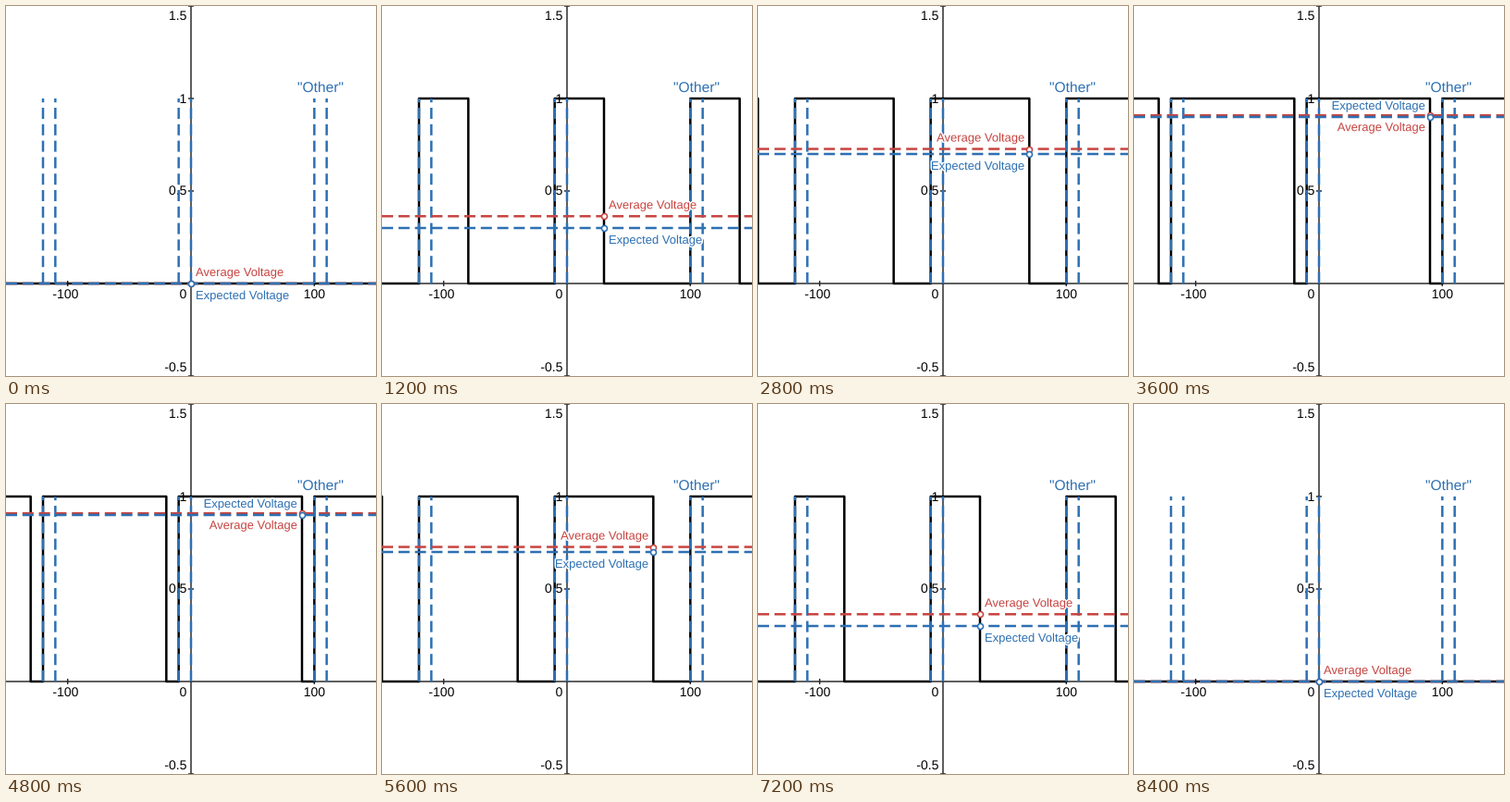
Write a matplotlib script that moves like this. It is 400 px wide and 400 px high and loops after 8.8 s.

```python
import matplotlib.pyplot as plt
from matplotlib.animation import FuncAnimation
from matplotlib.patheffects import withStroke

SIZE, DPI = 400, 100
PT = 72 / DPI  # points per pixel
STEPS, HOLD = 22, 400
PERIOD, START = 110, -10
RED, BLUE, AXIS = "#c74440", "#2d70b3", "#2a2a2a"
WIDTH = 2.5

plt.rcParams["font.family"] = "Liberation Sans"
fig = plt.figure(figsize=(SIZE / DPI, SIZE / DPI), dpi=DPI, facecolor="white")
ax = fig.add_axes([0, 0, 1, 1])
ax.set_xlim(0, SIZE)
ax.set_ylim(SIZE, 0)
ax.axis("off")


def px(x):
    return 200 + x * 4 / 3


def py(v):
    return 300 - 200 * v


def line(xs, ys, color, width, z, dashed=False):
    style = (0, (12 / WIDTH, 5.8 / WIDTH)) if dashed else "-"
    return ax.plot(xs, ys, color=color, lw=width * PT, ls=style, zorder=z,
                   dash_capstyle="butt", solid_capstyle="butt",
                   solid_joinstyle="round", snap=False)[0]


def label(x, y, text, size, color, ha, z):
    halo = withStroke(linewidth=3 * PT, foreground="white")
    return ax.text(x, y, text, fontsize=size * PT, color=color, ha=ha,
                   va="baseline", zorder=z, path_effects=[halo])


def dot(color, z):
    return ax.plot([], [], "o", ms=6 * PT, mfc="white", mec=color,
                   mew=1.6 * PT, zorder=z, snap=False)[0]


# axes, ticks and their numbers
line([0, SIZE], [300, 300], AXIS, 1.5, 1)
line([200, 200], [0, SIZE], AXIS, 1.5, 1)
for x in (-100, 100):
    line([px(x)] * 2, [297, 303], AXIS, 1.5, 1)
for v in (-0.5, 0.5, 1, 1.5):
    line([197, 203], [py(v)] * 2, AXIS, 1.5, 1)
label(64.3, 316, "-100", 14, "black", "center", 2)
label(px(100), 316, "100", 14, "black", "center", 2)
label(195.3, 316, "0", 14, "black", "right", 2)
for y, text in ((15, "1.5"), (105, "1"), (204, "0.5"), (395, "-0.5")):
    label(195.3, y, text, 14, "black", "right", 2)

# fixed windows in each period
for n in (-1, 0, 1):
    for x in (START, 0):
        line([px(x + n * PERIOD)] * 2, [py(0), py(1)], BLUE, WIDTH, 4, True)
label(340, 93, '"Other"', 15.6, BLUE, "center", 9)

wave = line([], [], "black", WIDTH, 3)
avg_line = line([], [], RED, WIDTH, 5, True)
exp_line = line([], [], BLUE, WIDTH, 6, True)
avg_dot, exp_dot = dot(RED, 7), dot(BLUE, 8)
avg_text = label(0, 0, "Average Voltage", 13, RED, "left", 9)
exp_text = label(0, 0, "Expected Voltage", 13, BLUE, "left", 9)


def wave_points(a):
    if a in (0, 100):
        return [0, SIZE], [py(a / 100)] * 2
    xs, ys = [], []
    for n in range(-2, 3):
        rise, fall = START + n * PERIOD, a + n * PERIOD
        xs += [px(rise), px(rise), px(fall), px(fall)]
        ys += [py(0), py(1), py(1), py(0)]
    return xs, ys


def place(text, x, y, above):
    left = x < 290
    end = x + 5 if left else x - 5
    if above and not left:
        end = min(end, 315)  # stay clear of the fixed label
    text.set_ha("left" if left else "right")
    text.set_position((end, y - 8 if above else y + 17))


def draw(i):
    a = 10 * min(i, STEPS - 1 - i)
    mean = (a - START) / PERIOD if a else 0
    x, y_avg, y_exp = px(a), py(mean), py(a / 100)
    wave.set_data(*wave_points(a))
    avg_line.set_data([0, SIZE], [y_avg] * 2)
    exp_line.set_data([0, SIZE], [y_exp] * 2)
    avg_dot.set_data([x], [y_avg])
    exp_dot.set_data([x], [y_exp])
    avg_above = a < 90
    place(avg_text, x, y_avg, avg_above)
    place(exp_text, x, y_exp, not avg_above)
    return wave, avg_line, exp_line, avg_dot, exp_dot, avg_text, exp_text


def reset():
    return draw(0)


anim = FuncAnimation(fig, draw, frames=STEPS, init_func=reset,
                     interval=HOLD, repeat=True, repeat_delay=0, blit=False)
plt.show()
```
